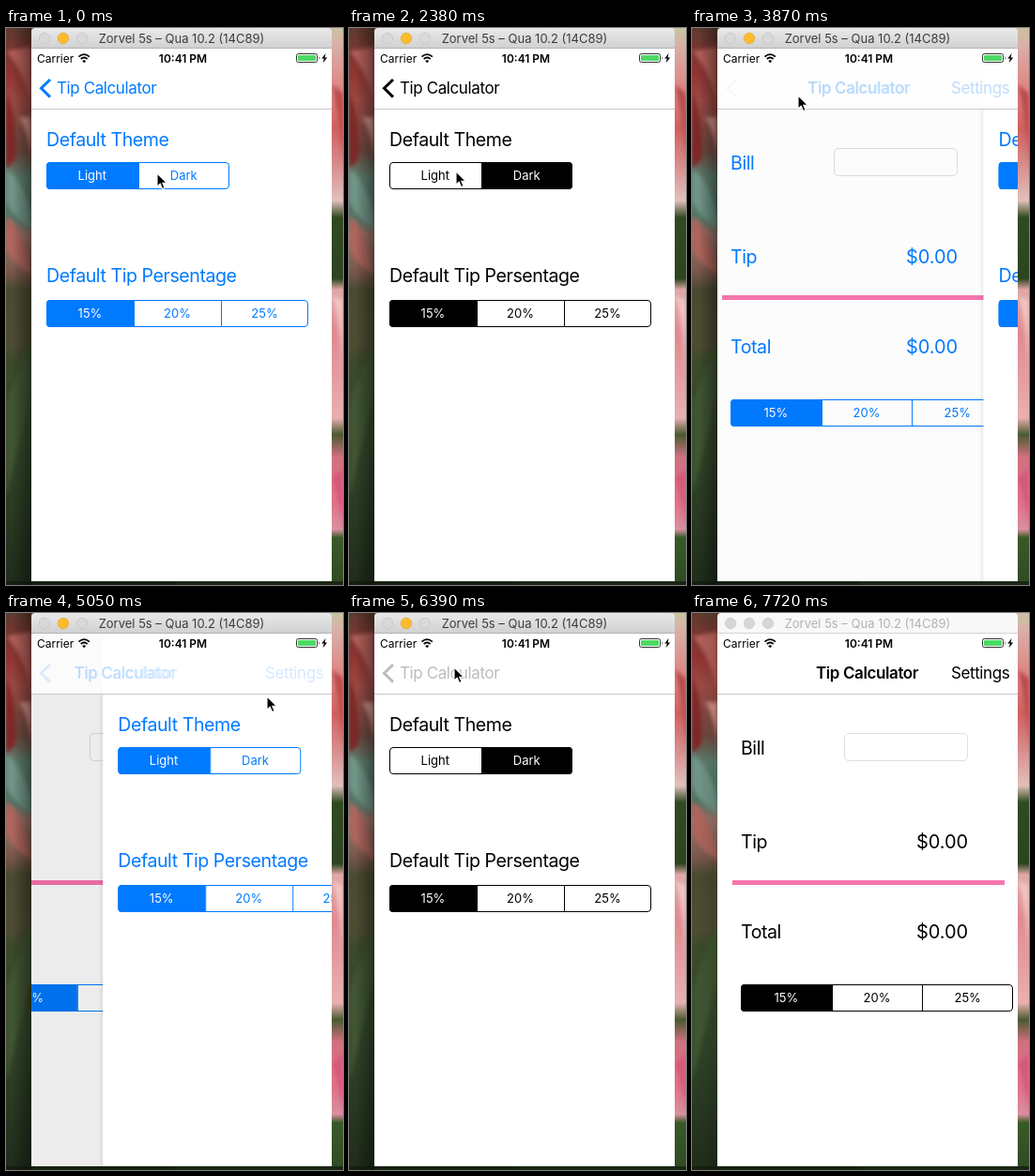
Recreate the animation shown at these times as an HTML page. Size 359 by 594 pixels, loop 7.82 s.

```html
<!DOCTYPE html>
<html lang="en">
<head>
<meta charset="utf-8">
<title>Tip Calculator settings</title>
<style>
  html, body { margin: 0; width: 100%; height: 100%; overflow: hidden; }
  svg { display: block; width: 100vw; height: 100vh; }
  text { font-family: Inter, Roboto, sans-serif; fill: currentColor; white-space: pre; }
  .head { font-size: 19.6px; letter-spacing: -.45px; }
  .amount { font-size: 20px; letter-spacing: -.1px; text-anchor: end; }
  .nav { font-size: 17px; letter-spacing: -.4px; }
  .bold { font-weight: 600; }
  .seg { font-size: 13px; text-anchor: middle; }
  .bar { font-size: 13px; text-anchor: middle; }
  .status { font-size: 12px; fill: #000; }
</style>
</head>
<body>
<svg id="stage" viewBox="0 0 359 594" preserveAspectRatio="none">
  <defs>
    <linearGradient id="left" x2="0" y2="1"></linearGradient>
    <linearGradient id="right" x2="0" y2="1"></linearGradient>
    <linearGradient id="chrome" x2="0" y2="1">
      <stop stop-color="#e9e9e9"/><stop offset="1" stop-color="#d0d0d0"/>
    </linearGradient>
    <linearGradient id="edge">
      <stop stop-color="#000" stop-opacity="0"/><stop offset="1" stop-color="#000" stop-opacity=".07"/>
    </linearGradient>
    <linearGradient id="shadowLeft">
      <stop stop-color="#000" stop-opacity="0"/><stop offset="1" stop-color="#000" stop-opacity=".4"/>
    </linearGradient>
    <filter id="soft"><feGaussianBlur stdDeviation="2"/></filter>
    <clipPath id="screen"><rect x="27" y="22" width="320" height="568"/></clipPath>
  </defs>
  <g id="wallpaper">
    <rect width="180" height="594" fill="url(#left)"/>
    <rect x="180" width="179" height="594" fill="url(#right)"/>
    <g filter="url(#soft)">
      <path d="M0 25 Q16 40 27 80 V20 Z" fill="#b4605a"/>
      <path d="M0 68 Q12 95 10 140 L0 150 Z" fill="#7e2525"/>
      <path d="M14 95 Q24 110 27 140 V95 Z" fill="#cf9088"/>
      <path d="M0 150 Q20 165 27 200 V215 Q10 205 0 185 Z" fill="#6f9486"/>
      <path d="M0 200 Q20 215 27 262 Q10 255 0 235 Z" fill="#ad655c"/>
      <path d="M0 400 L27 330 V390 L0 500 Z" fill="#3f5430"/>
      <path d="M347 60 Q356 90 359 150 V70 Z" fill="#b84848"/>
      <path d="M347 285 Q356 310 359 370 V290 Z" fill="#f0c4c4"/>
      <path d="M347 480 Q355 500 359 535 V470 Z" fill="#d4587a"/>
    </g>
    <rect y="590" width="359" height="4" fill="#141d10" opacity=".8"/>
  </g>
  <g id="scene"></g>
</svg>
<script>
const LOOP = 7820;
const BLUE = '#007aff';

const changes = [0, 150, 300, 450, 600, 740, 890, 1190, 1340, 1490, 1640, 1790,
  2080, 2230, 2380, 2820, 2970, 3120, 3270, 3570, 3720, 3870, 4020, 4170, 4310, 4460, 4610,
  4750, 4900, 5050, 5200, 5340, 5490, 5640, 5790, 5940, 6090, 6390, 6540, 6690, 6830, 6970, 7720];

const themes = [[-1000, false], [300, true], [1190, false], [2080, true], [2820, false], [5490, true]];

// page 1 is the settings page, page 0 the calculator
const slides = [
  { press: -2000, start: -2000, page: 1 },
  { press: 3570, start: 3604, page: 0 },
  { press: 4750, start: 4853, page: 1 },
  { press: 6390, start: 6430, page: 0 },
];

const pointer = [[0, 161, 155], [450, 161, 155], [890, 114, 154], [1490, 114, 154],
  [1790, 165, 153], [2080, 165, 153], [2380, 114, 153], [2970, 114, 153], [3270, 113, 72],
  [4020, 113, 72], [4310, 215, 32], [4610, 290, 66], [4900, 290, 66], [5050, 278, 89],
  [5340, 183, 143], [5790, 183, 143], [6090, 112, 58], [LOOP, 112, 58]];

const clamp = v => Math.max(0, Math.min(1, v));
const mix = (a, b, p) => a + (b - a) * p;
const latest = (list, time) => list.filter(time).pop();

function gradient(id, stops) {
  document.getElementById(id).innerHTML =
    stops.map(([at, color]) => `<stop offset="${at}" stop-color="${color}"/>`).join('');
}
gradient('left', [[0, '#5f3a30'], [.08, '#8f3431'], [.13, '#9d4a44'], [.22, '#6f4a40'],
  [.27, '#5c7f70'], [.34, '#527262'], [.37, '#9b756a'], [.44, '#77564a'], [.47, '#4a4a32'],
  [.57, '#4d4c33'], [.6, '#3b4a2a'], [.75, '#33472a'], [1, '#1f2c1a']]);
gradient('right', [[0, '#c9c4a0'], [.03, '#d8b0a8'], [.1, '#dd8a88'], [.18, '#d06060'],
  [.25, '#d89090'], [.31, '#e0c0bc'], [.34, '#304a20'], [.45, '#2c4520'], [.47, '#e0a8a8'],
  [.55, '#e08a90'], [.7, '#e8b0b0'], [.73, '#4a5a30'], [.77, '#d07080'], [.85, '#e07088'],
  [.9, '#d890a0'], [.915, '#3a5a28'], [1, '#2f4a22']]);

const text = (x, y, cls, label, extra = '') =>
  `<text x="${x}" y="${y}" class="${cls}" ${extra}>${label}</text>`;

function segments(x, y, width, labels, selected, fade = 0) {
  const id = `seg${y}`, cell = width / labels.length;
  const cells = labels.map((label, i) => {
    const left = x + Math.round(i * cell), on = i === selected;
    const fill = on ? 'currentColor' : `rgba(0,0,0,${fade})`;
    return `<rect x="${left}" y="${y}" width="${Math.ceil(cell)}" height="29" fill="${fill}"/>` +
      (i ? `<path d="M${left + .5} ${y}v29" stroke="currentColor"/>` : '') +
      text(x + (i + .5) * cell, y + 19, 'seg', label, on ? 'style="fill:#fff"' : '');
  }).join('');
  return `<clipPath id="${id}"><rect x="${x}" y="${y}" width="${width}" height="29" rx="4"/></clipPath>
    <g clip-path="url(#${id})">${cells}</g>
    <rect x="${x + .5}" y="${y + .5}" width="${width - 1}" height="28" rx="3.5" fill="none" stroke="currentColor"/>`;
}

const percents = ['15%', '20%', '25%'];

const calculator = () => `<rect x="27" y="22" width="420" height="568" fill="#fff"/>
  ${text(52, 151, 'head', 'Bill')}
  <rect x="162.5" y="128.5" width="131" height="29" rx="4.5" fill="#fff" stroke="#dedede"/>
  ${text(52, 251, 'head', 'Tip')}${text(294, 251, 'amount', '$0.00')}
  <rect x="43" y="285" width="290" height="5" fill="#f875ae"/>
  ${text(52, 347, 'head', 'Total')}${text(294, 347, 'amount', '$0.00')}
  ${segments(52, 396, 290, percents, 0)}`;

const settings = (dark, fade) => `<rect x="22" y="87" width="5" height="503" fill="url(#edge)"/>
  <rect x="27" y="22" width="320" height="568" fill="#fff"/>
  ${text(43, 126, 'head', 'Default Theme')}
  ${segments(43, 143, 195, ['Light', 'Dark'], dark ? 1 : 0, fade)}
  ${text(43, 271, 'head', 'Default Tip Persentage')}
  ${segments(43, 290, 279, percents, 0)}`;

function navigation(shown, back, home) {
  const shift = 78 * (1 - shown);
  return `<rect x="27" y="22" width="320" height="64" fill="#fff" opacity=".8"/>
    <path d="M27 86.5h320" stroke="#c9c9c9"/>
    <g opacity="${back}">
      <path d="M47 55l-9.5 9.3 9.5 9.3" fill="none" stroke="currentColor" stroke-width="3"/>
      ${text(54 + shift, 70, 'nav', 'Tip Calculator')}
    </g>
    <g opacity="${home}">
      ${text(54 + shift, 70, 'nav bold', 'Tip Calculator')}
    </g>`;
}

const statusBar = () => `${text(33, 36.5, 'status', 'Carrier')}
  <g fill="none" stroke="#000" stroke-width="1.7">
    <path d="M77.5 30.6q5.7-5 11.4 0M79.7 33q3.5-3 7 0"/>
  </g>
  <path d="M83.2 37.3l-2-2.4q2-1.5 4 0z"/>
  ${text(188.5, 36.5, 'status bold', '10:41 PM', 'text-anchor="middle"')}
  <rect x="309.5" y="27.5" width="22" height="9" rx="2" fill="#fff" stroke="#333"/>
  <rect x="311" y="29" width="19" height="6" rx=".6" fill="#4cd964"/>
  <path d="M333 30.3q1.6 1.7 0 3.4z" fill="#333"/>
  <path d="M340.6 27l-4.4 5.6h2.6l-1.2 4.6 4.6-5.8h-2.7z"/>`;

function titleBar(active) {
  const lights = [41, 61, 81].map((x, i) => {
    const fill = !active ? '#d6d6d6' : i === 1 ? '#fdbc2e' : '#d9d9d9';
    const ring = !active ? '#cacaca' : i === 1 ? '#e6a523' : '#c2c2c2';
    return `<circle cx="${x}" cy="11" r="5.7" fill="${fill}" stroke="${ring}" stroke-width=".7"/>`;
  }).join('');
  return `<path d="M27 22V4q0-4 4-4h312q4 0 4 4v18z" fill="${active ? 'url(#chrome)' : '#f8f8f8'}"/>
    <path d="M27 21.5h320" stroke="${active ? '#b4b4b4' : '#d5d5d5'}"/>${lights}
    ${text(187, 16, 'bar', 'Zorvel 5s – Qua 10.2 (14C89)', `style="fill:${active ? '#3c3c3c' : '#b2b2b2'}"`)}`;
}

function cursor(t) {
  const next = Math.max(1, pointer.findIndex(key => key[0] > t));
  const [a, b] = [pointer[next - 1], pointer[next]];
  const p = (t - a[0]) / (b[0] - a[0]);
  return `<path transform="translate(${mix(a[1], b[1], p)} ${mix(a[2], b[2], p)})"
    d="M0 0v14.2l3.3-3.1 2.3 5.5 2.5-1-2.3-5.3h4.6z" fill="#000" stroke="#fff" stroke-width="1.1"/>`;
}

function pageState(t) {
  const slide = latest(slides, s => s.press <= t);
  const age = t - slide.start;
  const x = .014 * Math.max(0, age);
  const done = age >= 500;
  const travel = done ? 1 : 1 - (1 + x) * Math.exp(-x);
  const arriving = done ? 1 : clamp((age - 60) / 440) ** 1.8;
  const leaving = age < 0 ? 1 : clamp(1 - age / 330) ** 2;
  const toSettings = slide.page === 1;
  const pressed = age < 0 ? .26 : 1;
  return {
    shown: toSettings ? travel : 1 - travel,
    back: toSettings ? arriving : leaving * pressed,
    home: toSettings ? leaving : arriving,
    action: toSettings ? leaving * pressed : arriving,
  };
}

function draw(t) {
  const [since, dark] = latest(themes, key => key[0] <= t);
  const fade = .5 * clamp(1 - (t - since) / 170);
  const { shown, back, home, action } = pageState(t);
  const active = t < 7720;
  const scene = document.getElementById('scene');
  scene.style.color = dark ? '#000' : BLUE;
  scene.innerHTML = `
    <rect x="7" width="20" height="594" fill="url(#shadowLeft)" opacity="${active ? 1 : .35}"/>
    ${titleBar(active)}
    <g clip-path="url(#screen)">
      <g transform="translate(${-96 * shown} 0)">${calculator()}</g>
      <rect x="27" y="22" width="320" height="568" opacity="${.1 * shown}"/>
      ${shown > 0 ? `<g transform="translate(${320 * (1 - shown)} 0)">${settings(dark, fade)}</g>` : ''}
      ${navigation(shown, back, home)}
      ${text(276, 70, 'nav', 'Settings', `opacity="${action}"`)}
      ${statusBar()}
    </g>
    ${active ? cursor(t) : ''}`;
}

let drawn = -1;
function tick() {
  const now = performance.now() % LOOP;
  const t = latest(changes, at => at <= now);
  if (t !== drawn) draw(drawn = t);
  requestAnimationFrame(tick);
}
tick();
</script>
</body>
</html>
```
